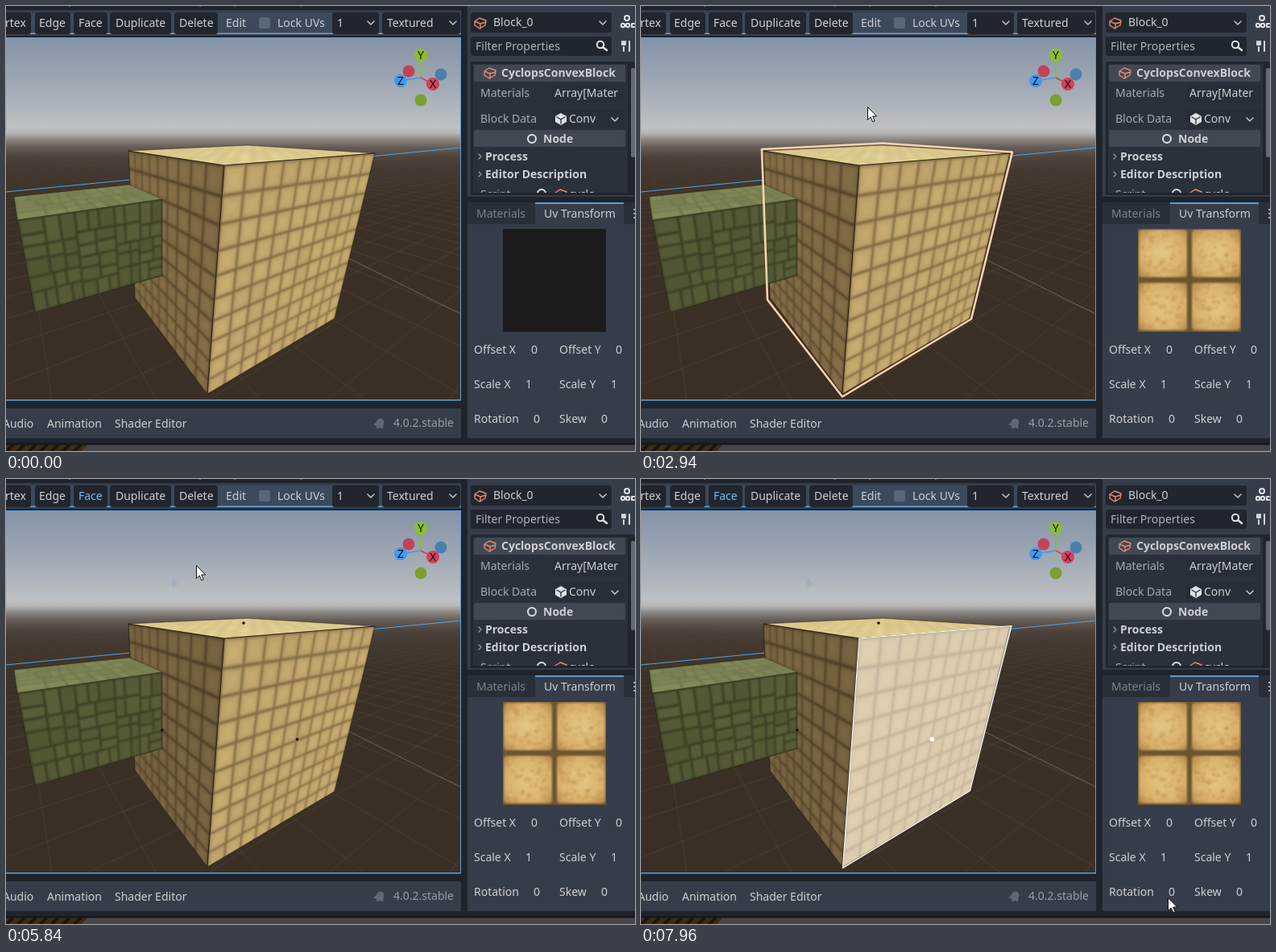
Recreate the animation shown at these times as an HTML page with a canvas. Size 781 by 553 pixels, loop 8000 ms.

```html
<!DOCTYPE html>
<html lang="en">
<head>
<meta charset="utf-8">
<title>Block editor</title>
<style>
  html, body { margin: 0; width: 100%; height: 100%; overflow: hidden; background: #1f242c; }
  svg, canvas { position: absolute; left: 0; top: 0; display: block; }
  #view { top: 40px; }
  #tex { left: 617px; top: 277px; }
  text { font: 14px "Noto Sans", "Open Sans", sans-serif; fill: #cdcfd3; white-space: pre; }
  .bold { font-weight: 700; }
</style>
</head>
<body>
<svg id="ui" width="781" height="553"></svg>
<canvas id="view" width="565" height="449"></canvas>
<canvas id="tex" width="128" height="128"></canvas>
<svg id="top" width="781" height="553">
  <path id="cursor" d="M.5 .5V16.5L4.2 13 6.8 18.8 9.2 17.8 6.7 12H11.6Z" fill="#fff" stroke="#111" stroke-width="1"/>
</svg>
<script>
const LOOP = 8000;
const SELECT = 1140, PREVIEW = 1200, FACE_MODE = 5260, FACE_PICK = 6075;
const $ = id => document.getElementById(id);
const ui = $('ui');

// ---------- interface ----------
function add(tag, attrs, text) {
  const el = document.createElementNS('http://www.w3.org/2000/svg', tag);
  for (const k in attrs) el.setAttribute(k, attrs[k]);
  if (text) el.textContent = text;
  return ui.appendChild(el);
}
const box = (x, y, r, b, fill, rx = 0) => add('rect', { x, y, width: r - x, height: b - y, fill, rx });
const label = (x, y, s, fill, cls = '') => add('text', { x, y, class: cls, ...(fill && { style: 'fill:' + fill }) }, s);
const stroke = (d, color, width = 1.6) => add('path', { d, fill: 'none', stroke: color, 'stroke-width': width, 'stroke-linejoin': 'round', 'stroke-linecap': 'round' });
const ring = (cx, cy, r) => add('circle', { cx, cy, r, fill: 'none', stroke: '#e0e2e5', 'stroke-width': 2 });
const chevron = (x, y) => stroke(`M${x - 4} ${y - 2}l4 4 4-4`, '#c0c3c8');
const polyIcon = (x, y) => stroke(`M${x - 7} ${y - 2}l6-4 8 3-1 6-7 4-6-4zl7 3 7-2m-7 2v6`, '#e58a70', 1.4);

const PANEL = '#363d4a', DARK = '#21262e', HOVER = '#50617a', BLUE = '#70bafa', DIM = '#a4a8b0';
const buttons = [[-25, 31, -17, 'Vertex'], [36, 80, 41, 'Edge'], [84, 126, 90, 'Face'],
  [129, 205, 136, 'Duplicate'], [209, 263, 215, 'Delete']];

box(0, 5, 565, 37, PANEL);
box(0, 8, 565, 34, '#3c495b');
box(0, 33.5, 565, 35, '#6ba6df');
const parts = buttons.map(([x, r, tx, s]) => ({
  x, r, name: s, bg: box(x, 8, r, 35, DARK, 3), text: label(tx, 26, s)
}));
box(405, 8, 463, 35, DARK, 3);
box(467, 8, 564, 35, DARK, 3);
label(273, 26, 'Edit');
box(314, 14, 328, 28, '#59677a', 3);
label(337, 26, 'Lock UVs');
label(411, 26, '1');
label(473, 26, 'Textured');
chevron(453, 21);
chevron(555, 21);
for (const x of [78, 240, 283, 365]) box(x, 0, x + 2, 1, '#59616f');

box(0, 39, 565, 490.5, '#5f9fd6');
box(0, 500, 565, 537, PANEL);
label(-4, 524, 'Audio');
label(51, 524, 'Animation');
label(135, 524, 'Shader Editor');
add('path', { d: 'M457 522q3-3 3-6 1-4 5-4 4 1 4 5 0 4 1 7zM461 523h4v2h-3z', fill: '#626873', transform: 'rotate(15 463 518)' });
label(481, 523, '4.0.2.stable', '#989da5');
box(0, 545, 781, 553, '#46464a');
add('path', { d: 'M0 545H101L94 553H0Z', fill: '#3d2a17' });
for (let x = 8; x < 100; x += 14) stroke(`M${x} 546l-7 7`, '#1f150c', 4);
box(0, 543, 781, 545.5, '#15181d');

box(573, 0, 781, 237, PANEL);
box(577, 8, 752, 33, DARK, 3);
polyIcon(589, 21);
label(605, 25, 'Block_0');
chevron(741, 21);
ring(771, 15, 3);
ring(766, 24, 2.2);
ring(772, 24, 2.2);
stroke('M780 22h-3v4h3', '#e0e2e5', 2);
box(577, 38, 752, 62, DARK, 3);
label(583, 55, 'Filter Properties', '#aeb2b9');
stroke('M741 51l5 4', '#e0e2e5', 2.4);
ring(738, 48, 4.2);
stroke('M767 51v5M767 44v3M774 50v6M765 44v4h4v-4M774 44v5', '#d6d8dc', 2);

box(577, 69, 781, 235, DARK, 3);
box(580, 72, 772, 232, '#2b313b');
box(581, 73, 769, 94, '#424853', 2);
polyIcon(601, 83);
label(615, 88, 'CyclopsConvexBlock', '', 'bold');
label(589, 113, 'Materials', DIM);
box(677, 97, 769, 120, '#282e37', 2);
label(681, 113, 'Array[Mater');
label(589, 145, 'Block Data', DIM);
box(677, 129, 769, 152, '#282e37', 2);
add('path', { d: 'M682 137l7-4 7 4v7l-7 4-7-4z', fill: '#e0e2e5' });
stroke('M684 138l5 3 5-3m-5 3v5', '#252a33', 1.3);
label(699, 145, 'Conv');
chevron(756, 141);
box(581, 154, 769, 175, '#424853', 2);
ring(653, 165, 5);
label(667, 170, 'Node', '', 'bold');
for (const [y, s] of [[187, 'Process'], [209, 'Editor Description']]) {
  stroke(`M587 ${y - 3}l3 3-3 3`, '#8f959e', 1.3);
  label(595, y + 5, s, '', 'bold');
}
label(589, 239, 'Script', DIM);
ring(665, 233, 5);
polyIcon(689, 234);
label(699, 239, 'cyclo');
box(573, 232, 781, 237, PANEL);
box(577, 232, 781, 235, DARK);
box(776, 77, 781, 188, '#646a75', 2);

box(573, 237, 781, 244, '#1f242c');
box(573, 244, 781, 271, '#292f39');
box(573, 271, 781, 537, PANEL);
box(657, 244, 767, 272, PANEL);
box(657, 244, 767, 246, '#6299cf');
label(584, 263, 'Materials', '#7c828c');
label(668, 263, 'Uv Transform');
for (const y of [253, 258, 263]) box(779, y - 1, 781, y + 1, '#a4a8b0');
for (const [y, a, ax, av, b, bx, bv] of [
  [432, 'Offset X', 652, 0, 'Offset Y', 757, 0],
  [475, 'Scale X', 645, 1, 'Scale Y', 751, 1],
  [518, 'Rotation', 655, 0, 'Skew', 739, 0]]) {
  label(581, y, a); label(ax, y, String(av));
  label(687, y, b); label(bx, y, String(bv));
}

// ---------- 3D view ----------
const g = $('view').getContext('2d');
let seed;
const rnd = () => (seed = (seed * 16807) % 2147483647) / 2147483647;
const rgb = (c, k = 1) => `rgb(${c.map(v => Math.min(255, Math.round(v * k))).join()})`;

// projective map from the unit square to four corners
function project([[x0, y0], [x1, y1], [x2, y2], [x3, y3]]) {
  const ax = x1 - x2, ay = y1 - y2, bx = x3 - x2, by = y3 - y2;
  const sx = x0 - x1 + x2 - x3, sy = y0 - y1 + y2 - y3, d = ax * by - bx * ay;
  const p = (sx * by - bx * sy) / d, q = (ax * sy - sx * ay) / d;
  return (u, v) => {
    const w = 1 + p * u + q * v;
    return [(x0 + (x1 - x0 + p * x1) * u + (x3 - x0 + q * x3) * v) / w,
            (y0 + (y1 - y0 + p * y1) * u + (y3 - y0 + q * y3) * v) / w];
  };
}
function trace(pts) {
  g.beginPath();
  pts.forEach(p => g.lineTo(...p));
  g.closePath();
}
function fill(pts, color) { trace(pts); g.fillStyle = color; g.fill(); }
function outline(pts, color, width) {
  trace(pts); g.strokeStyle = color; g.lineWidth = width; g.lineJoin = 'round'; g.stroke();
}
function line(x, y, r, b, color, width = 1) {
  g.beginPath(); g.moveTo(x, y); g.lineTo(r, b);
  g.strokeStyle = color; g.lineWidth = width; g.stroke();
}
function dot(x, y, r, color) {
  g.beginPath(); g.arc(x, y, r, 0, 7); g.fillStyle = color; g.fill();
}
const patch = (m, u, v, w, h) => [m(u, v), m(u + w, v), m(u + w, v + h), m(u, v + h)];

function face(quad, gap, paint) {
  g.save();
  fill(quad, rgb(gap));
  g.clip();
  g.filter = 'blur(0.8px)';
  paint(project(quad));
  g.restore();
}
function tiled(quad, cols, rows, body, gap) {
  face(quad, gap, m => {
    const w = 1 / cols, h = 1 / rows;
    for (let i = 0; i < cols; i++) for (let j = 0; j < rows; j++) {
      const k = 0.97 + rnd() * 0.05;
      const rect = e => patch(m, (i + e) * w, (j + e) * h, w * (1 - 2 * e), h * (1 - 2 * e));
      fill(rect(0.05), rgb(body, k * 0.92));
      fill(rect(0.13), rgb(body, k));
      fill(rect(0.28), rgb(body, k * 1.03));
    }
  });
}
function stones(quad, cols, rows, body, gap) {
  face(quad, gap, m => {
    const split = (u, v, w, h) => {
      const a = w * cols, b = h * rows;
      if (Math.max(a, b) > 1.5 || a * b > 1.3) {
        const f = 0.38 + rnd() * 0.24;
        if (a > b) { split(u, v, w * f, h); split(u + w * f, v, w * (1 - f), h); }
        else { split(u, v, w, h * f); split(u, v + h * f, w, h * (1 - f)); }
        return;
      }
      const e = 0.07 / cols, f = 0.07 / rows;
      fill(patch(m, u + e, v + f, w - 2 * e, h - 2 * f), rgb(body, 0.94 + rnd() * 0.1));
    };
    split(0, 0, 1, 1);
  });
}

const A = [271, 198], B = [458, 183], C = [408, 388], D = [250, 482],
      E = [152, 180], F = [160, 362], G = [300, 173];
const front = [A, B, C, D], side = [A, E, F, D], lid = [A, B, G, E];

function ground() {
  const sky = g.createLinearGradient(0, 40, 0, 490);
  [[0, '#8593a8'], [.12, '#9ea7b3'], [.2, '#b2b7bd'], [.245, '#bfc1c3'], [.262, '#b7b6b5'],
   [.276, '#94908d'], [.289, '#7a736e'], [.302, '#645b55'], [.33, '#4c423a'], [.36, '#42372e'],
   [.45, '#3c3126'], [1, '#3a2e25']]
    .forEach(s => sky.addColorStop(...s));
  g.fillStyle = sky;
  g.fillRect(0, 40, 565, 450);
  const fade = g.createLinearGradient(0, 170, 0, 300);
  fade.addColorStop(0, 'rgba(190,180,170,0)');
  fade.addColorStop(1, 'rgba(190,180,170,.09)');
  for (let i = -10; i < 40; i++) {
    line(7, 158, 57 + i * 130, 490, fade);
    line(798, 157, 700 - i * 150, 490, fade);
  }
  line(250, 226, 565, 383, 'rgba(190,185,180,.35)');
  line(0, 231, 565, 176, '#4aa3ea', 1.2);
}

function gizmo() {
  const red = '#d63f5a', green = '#8abf2c', blue = '#3d9af0';
  dot(500, 81, 7.5, '#c24358');
  dot(540, 85, 7.5, '#4a7fae');
  dot(515, 117, 7.5, '#7c9f2f');
  line(515, 89, 515, 61, green, 1.6);
  line(515, 89, 490, 93, blue, 1.6);
  line(515, 89, 530, 97, red, 1.6);
  g.font = '14px "Noto Sans", sans-serif';
  g.textAlign = 'center';
  for (const [x, y, c, s] of [[515, 61, green, 'Y'], [490, 93, blue, 'Z'], [530, 97, red, 'X']]) {
    dot(x, y, 8, c);
    g.fillStyle = '#111';
    g.fillText(s, x, y + 5);
  }
}

function drawView(mode) {
  seed = 4217;
  g.setTransform(1, 0, 0, 1, 0, -40);
  ground();
  tiled(lid, 10, 9, [229, 211, 151], [221, 201, 138]);
  const deep = mode > 1 ? 0.92 : 1;
  tiled(side, 9, 9.8, [128 * deep, 107 * deep, 69 * deep], [84 * deep, 68 * deep, 42 * deep]);
  tiled(front, 10, 9.8, [191, 164, 108], [132, 107, 65]);
  [front, side, lid].forEach(q => outline(q, 'rgba(25,20,12,.5)', 1));

  const p = [10, 237], q = [152, 222], r = [194, 240], s = [14, 266];
  const wall = [s, r, [194, 335], [36, 381]];
  stones(wall, 8.5, 5, [86, 91, 54], [61, 65, 38]);
  stones([p, q, r, s], 8, 4, [127, 134, 88], [113, 120, 77]);
  outline(wall, 'rgba(30,32,16,.5)', 1);
  line(...p, ...q, 'rgba(30,32,16,.5)');
  line(...p, ...s, 'rgba(30,32,16,.5)');

  if (mode === 1)
    outline([[150, 178], [300, 170.5], [461, 181.5], [410, 389], [250, 485.5], [157, 365]], '#ffd2ad', 2.6);
  if (mode > 1) {
    const picked = mode === 3;
    if (picked) {
      const hot = [A, [460, 182.5], [408.5, 387.5], [250.5, 483.5]];
      fill(hot, 'rgba(243,236,223,.57)');
      outline(hot, '#fff', 1.2);
    }
    fill([[209, 123], [213, 131], [208, 136], [205, 129]], 'rgba(120,155,185,.3)');
    dot(295, 179, 1.8, '#16120c');
    dot(194, 312, 1.8, '#16120c');
    dot(361.5, 323.5, picked ? 2.8 : 1.8, picked ? '#fff' : '#16120c');
  }
  gizmo();
  line(564.5, 40, 564.5, 490, '#5f9fd6');
}

function drawTexture(on) {
  const t = $('tex').getContext('2d');
  t.filter = 'none';
  t.fillStyle = on ? '#6d5430' : '#1b1b1b';
  t.fillRect(0, 0, 128, 128);
  if (!on) return;
  seed = 991;
  t.filter = 'blur(0.8px)';
  for (const x of [1, 67]) for (const y of [1, 67]) {
    const glow = t.createRadialGradient(x + 30, y + 30, 6, x + 30, y + 30, 42);
    glow.addColorStop(0, '#e3c381');
    glow.addColorStop(.6, '#d7b06b');
    glow.addColorStop(1, '#b08446');
    t.fillStyle = glow;
    t.beginPath(); t.roundRect(x, y, 60, 59, 4); t.fill();
    for (let i = 0; i < 110; i++) {
      t.fillStyle = rnd() < .6 ? 'rgba(180,122,58,.25)' : 'rgba(240,212,150,.22)';
      t.fillRect(x + 1 + rnd() * 54, y + 1 + rnd() * 54, 1 + rnd() * 5, 1 + rnd() * 4);
    }
  }
}

// ---------- motion ----------
// start, end, number of steps, and [step, x, y] waypoints
const moves = [
  [260, 800, 9, [[0, 700, 560], [1, 683, 531], [4, 520, 290], [6, 430, 209], [9, 319, 276]]],
  [1660, 2350, 11, [[0, 319, 276], [4, 357, 249], [7, 290, 140], [11, 196, 50]]],
  [2540, 3290, 11, [[0, 196, 50], [5, 298, 141], [11, 197, 47]]],
  [3370, 3850, 8, [[0, 197, 47], [4, 225, 40], [8, 262, 23]]],
  [4050, 4400, 6, [[0, 262, 23], [6, 128, 16]]],
  [4580, 4790, 3, [[0, 128, 16], [3, 124, 14]]],
  [4940, 5060, 3, [[0, 124, 14], [1, 121, 15], [3, 103, 24]]],
  [5680, 6140, 8, [[0, 103, 24], [4, 280, 135], [8, 428, 209]]],
  [6420, 7160, 12, [[0, 428, 209], [2, 506, 428], [12, 594, 471]]],
  [7270, 7700, 7, [[0, 594, 471], [5, 651, 517], [7, 639, 512]]],
  [7840, 7960, 2, [[0, 639, 512], [2, 654, 520]]]
];
function cursorAt(t) {
  const move = moves.filter(m => t >= m[0]).pop();
  if (!move) return [-50, -50];
  const [from, to, n, pts] = move;
  const k = Math.min(n, 1 + Math.floor((t - from) / (to - from) * (n - 1) + 1e-6));
  const i = pts.findIndex(p => p[0] >= k);
  const [ka, xa, ya] = pts[i - 1], [kb, xb, yb] = pts[i];
  const f = (k - ka) / (kb - ka);
  return [Math.round(xa + (xb - xa) * f), Math.round(ya + (yb - ya) * f)];
}

let lastMode = -1, lastTex = null;
function render(t) {
  const mode = t < SELECT ? 0 : t < FACE_MODE ? 1 : t < FACE_PICK ? 2 : 3;
  if (mode !== lastMode) drawView(lastMode = mode);
  const tex = t >= PREVIEW;
  if (tex !== lastTex) drawTexture(lastTex = tex);
  const [x, y] = cursorAt(t);
  $('cursor').setAttribute('transform', `translate(${x} ${y})`);
  for (const b of parts) {
    const hover = x >= b.x && x <= b.r && y >= 8 && y <= 34;
    const active = b.name === 'Face' && mode > 1;
    b.bg.setAttribute('fill', hover ? HOVER : DARK);
    b.text.style.fill = active ? BLUE : hover ? '#f0f1f3' : '#cdcfd3';
  }
}
const start = performance.now();
function tick() {
  render((performance.now() - start) % LOOP);
  requestAnimationFrame(tick);
}
tick();
</script>
</body>
</html>
```
